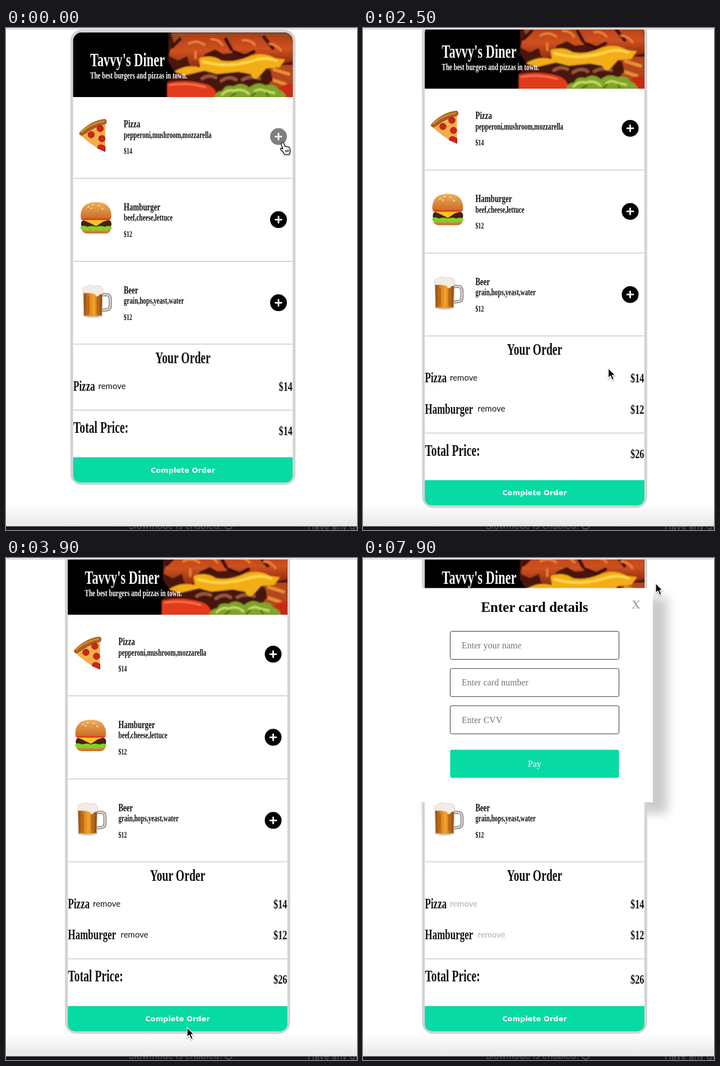
Recreate the animation shown at these times as an HTML page. Size 626 by 894 pixels, loop 8000 ms.

```html
<!DOCTYPE html>
<html lang="en">
<head>
<meta charset="utf-8">
<title>Diner order</title>
<style>
  html, body { margin: 0; height: 100%; overflow: hidden; background: #fff; }
  svg { display: block; }
  text { white-space: pre; }
  .slab { font-family: "Liberation Serif", Times, serif; font-weight: bold; }
  .serif { font-family: "Liberation Serif", Times, serif; }
  .round { font-family: Lato, sans-serif; font-size: 15px; }
  .wide { font: bold 12.9px "DejaVu Sans", Verdana, sans-serif; }
  .chrome { font: 16px Inter, sans-serif; fill: #5a5c62; }
</style>
</head>
<body>
<svg id="stage" width="626" height="894" viewBox="0 0 626 894">
  <defs>
    <linearGradient id="floor" x2="0" y2="1"><stop stop-color="#fff"/><stop offset="1" stop-color="#e6e6e6"/></linearGradient>
    <linearGradient id="bun" x2="0" y2="1"><stop stop-color="#f0ae5c"/><stop offset="1" stop-color="#c96f26"/></linearGradient>
    <linearGradient id="ale"><stop stop-color="#8f430a"/><stop offset=".3" stop-color="#d9821a"/><stop offset=".55" stop-color="#f3a52c"/><stop offset="1" stop-color="#8a3f0a"/></linearGradient>
    <linearGradient id="sauce" x2="0" y2="1"><stop stop-color="#b23c14"/><stop offset=".5" stop-color="#cf5220"/><stop offset="1" stop-color="#8e2a0e"/></linearGradient>
    <clipPath id="headClip"><path d="M119.7 123V23a15 15 0 0 1 15-15h361.6a15 15 0 0 1 15 15v100z"/></clipPath>
    <filter id="blur" x="-20%" y="-20%" width="140%" height="140%"><feGaussianBlur stdDeviation="9"/></filter>
    <filter id="soft"><feGaussianBlur stdDeviation=".9"/></filter>
    <filter id="drop" x="-50%" y="-50%" width="200%" height="200%"><feDropShadow dx="0" dy="1.5" stdDeviation="1.2" flood-opacity=".4"/></filter>
  </defs>

  <rect width="626" height="894" fill="#fff"/>
  <rect y="848" width="626" height="40" fill="url(#floor)"/>
  <rect id="shade" x="112" y="70" width="431" height="385" fill="#cbcbcb" filter="url(#blur)"/>

  <g id="page">
    <rect id="frame" x="114.7" y="3" width="401.6" rx="20" fill="#d3d3d3"/>
    <rect id="sheet" x="119.7" y="8" width="391.6" rx="15" fill="#fff"/>
    <g clip-path="url(#headClip)">
      <rect x="119" y="8" width="393" height="115"/>
      <g filter="url(#soft)">
        <path d="M290 8h222v116H287V96l16-14-14-22z" fill="#4a170b"/>
        <path d="M294 8h218v14q-40 10-90 2-60-6-122 4z" fill="#9c4a20"/>
        <path d="M291 50q2-24 22-32 24-14 46-4 24-8 44 6 14 10 8 24l-24 2-14-8-18 8-10 18q-10 14-18 0l-4-14-16 8z" fill="url(#sauce)"/>
        <path d="M404 14q24-10 48 2 36-6 60 8v36l-24 4-22-14-24 4-30-12z" fill="url(#sauce)"/>
        <path d="M296 34l14-14m96 22l20 8 16-8m18-26l16 20m-84-16l10 18" stroke="#3d1009" stroke-width="6" fill="none" stroke-linecap="round"/>
        <path d="M326 28q14-8 28 2m12-10q14 0 20 10m36-8q14-2 22 8m26-2q14 2 20 12M338 42v12" stroke="#ec7f3e" stroke-width="4" fill="none" stroke-linecap="round"/>
        <path d="M470 66h42v48h-42z" fill="#b5461b"/>
        <path d="M478 74l26 8m-30 10l24 8" stroke="#e79035" stroke-width="6" stroke-linecap="round"/>
        <path d="M318 78q60-14 154-2l4 18q-30 14-78 12-54 0-80-16z" fill="#47190f"/>
        <path d="M350 90q12-8 24-2m10 6q14-10 26-2m12 0q14-8 30-2" stroke="#95553e" stroke-width="6" fill="none" stroke-linecap="round"/>
        <path d="M300 78q20-14 46-8l-2-16q22-8 40 4 22 4 46-6 28-12 50 2l18 2-10 14-24 2-14 16q-8 6-14-6l-22-4-38 4-22-6-34 8z" fill="#f3ad17"/>
        <path d="M352 60q22 6 44 6 30-2 52-10 18-4 34 2" stroke="#ffd54a" stroke-width="5" fill="none" stroke-linecap="round"/>
        <path d="M287 124V98q34-8 70 2 18 6 20 24z" fill="#e23a1c"/>
        <path d="M291 102q34-6 66 4" stroke="#f47a4e" stroke-width="3" fill="none"/>
        <path d="M490 104q12-6 22-4v24h-22z" fill="#c92a14"/>
        <path d="M372 124q2-12 14-12 4-12 20-8 14-10 28 2 14-12 28-4 20-4 24 8 12 4 14 14z" fill="#7ea52a"/>
        <path d="M384 120q10-12 22-8 16-6 28 6m8-4q10-8 20-2l18 4" stroke="#c7dc64" stroke-width="4" fill="none"/>
        <path d="M400 122l10-6m28 6l8-8m22 8l-4-8" stroke="#47701a" stroke-width="3"/>
      </g>
    </g>
    <g id="pizza">
      <path d="M132 190Q151 186 177 168V221Q153 210 132 190z" fill="#f0ae48"/>
      <path d="M131 186Q152 164 177 162q5 4 1 9-20 6-42 21-7-1-5-6z" fill="#a95f1c"/>
      <path d="M134 186q18-17 42-20" stroke="#d08d3a" stroke-width="3" fill="none"/>
      <g fill="#cf2418" stroke="#a71a12"><circle cx="152" cy="190" r="5.7"/><circle cx="168" cy="179" r="5.7"/><circle cx="171" cy="197" r="5.7"/><path d="M163 214q0-7 8-6l6 3v9z"/></g>
    </g>
    <g id="burger">
      <path d="M135 352h52q2 14-11 14h-30q-13 0-11-14z" fill="url(#bun)"/>
      <rect x="134" y="342" width="54" height="14" rx="6" fill="#46210f"/>
      <path d="M133 354q4-4 12 0 8-3 16 0 8-3 15 0 8-3 12 0 2 5-4 4-5 5-10 1-6 5-12 0-6 4-12 0-7 4-11 0-7 1-6-5z" fill="#7ed32c"/>
      <path d="M135 341h51l-13 4-12 8-14-7z" fill="#ffc21c"/>
      <rect x="134" y="336" width="53" height="6" rx="3" fill="#e0402a"/>
      <path d="M133 336q0-26 28-26 27 0 27 26 0 3-4 3h-47q-4 0-4-3z" fill="url(#bun)"/>
      <path d="M146 319l2-1m6-3h2m9 1l2 1m4 4l2 2m-22-2h2" stroke="#fff0c5" stroke-width="1.6" stroke-linecap="round"/>
    </g>
    <g id="mug">
      <path d="M170 475h9q7 0 7 8v11q0 8-8 8l-8 1" fill="none" stroke="#7f7872" stroke-width="5.5"/>
      <path d="M170 475h9q7 0 7 8v11q0 8-8 8l-8 1" fill="none" stroke="#d8d3cd" stroke-width="3"/>
      <path d="M138 468h34l-1 45q-16 5-32 0z" fill="url(#ale)" stroke="#b9a78f" stroke-width="1.2"/>
      <path d="M147 478v30m16-30v30" stroke="#8a420c" stroke-width="1.5" opacity=".6"/>
      <path d="M140 513q15 4 30 0" stroke="#d9cfc2" stroke-width="3" fill="none"/>
      <path d="M138 472q-4-11 6-12 8-4 14 0 12-3 15 5 1 8-3 9-3-1-5 3-5 3-6-3-9-3-21-2z" fill="#f3ece4" stroke="#d6cabb" stroke-width=".8"/>
    </g>
    <g id="menu"></g>
    <g id="plusses"></g>
    <g id="orders"></g>
    <g id="total"></g>
  </g>

  <g id="modal">
    <rect x="95.5" y="53.5" width="421.5" height="381.5" fill="#fff"/>
    <text class="serif" x="306" y="96" font-size="25" font-weight="bold" text-anchor="middle">Enter card details</text>
    <text class="serif" x="487" y="90" font-size="22" font-weight="bold" text-anchor="middle" fill="#a9a9a9">X</text>
    <g id="fields"></g>
    <rect x="155.5" y="341.5" width="301" height="50" rx="3" fill="#08daa3"/>
    <text class="serif" x="306" y="372" font-size="16" text-anchor="middle" fill="#fff">Pay</text>
  </g>

  <rect width="626" height="2.5" fill="#fff"/>
  <rect y="1" width="626" height="1.5" fill="#dcc6ce"/>
  <rect y="887.5" width="626" height="7" fill="#14161d"/>
  <svg y="888" width="626" height="6">
    <text class="chrome" x="219" y="4">Slowmode is enabled.</text>
    <circle cx="397" cy="-2" r="6.5" fill="none" stroke="#5a5c62" stroke-width="1.5"/>
    <text class="chrome" x="538" y="5">Have any questions</text>
  </svg>

  <path id="arrow" d="M0 0V17.5L4 13.7 7 20.8 10.2 19.4 7.2 12.5H12.4z" stroke="#fff" stroke-width="1.3" filter="url(#drop)"/>
  <g id="hand" filter="url(#drop)" stroke="#000" stroke-width="1.2" stroke-linejoin="round">
    <path fill="#fff" d="M-1.5-.5c2-1.5 3 .5 3.5 2l1.7 5c.8-1.2 2.5-1 3 .3 1-.8 2.4-.5 2.8.6 1.5-.6 2.4.4 2.7 2l.8 5-1.5 5.6H3l-3-4.5c-1.5-2-3.5-3-4.5-5 0-2 2-2 3.5-.5l1 .6-3-8.5c-.4-1.2.3-2.2 1.5-2.6z"/>
    <path d="M4.5 12.5l1 4m1.5-4.5l1 4m1.5-4.5l.8 4"/>
  </g>
</svg>
<script>
const $ = id => document.getElementById(id);
const GREEN = '#08daa3', LOOP = 8000, ADD_AT = 1300, MODAL_AT = 5800, ROW = 55.4;

// The display face is condensed by one fixed ratio everywhere.
const slab = (x, y, size, text, anchor = 'start', color = '#111') =>
  `<text class="slab" transform="translate(${x} ${y}) scale(.68 1)" font-size="${size}" text-anchor="${anchor}" fill="${color}">${text}</text>`;
const rule = y => `<path d="M120 ${y}h391" stroke="#b4b4b4"/>`;

const menu = [
  ['Pizza', 'pepperoni,mushroom,mozzarella', 14],
  ['Hamburger', 'beef,cheese,lettuce', 12],
  ['Beer', 'grain,hops,yeast,water', 12],
];
$('menu').innerHTML =
  slab(150, 68, 33, "Tavvy's Diner", 'start', '#fbf9f2') +
  slab(150, 89.5, 16.3, 'The best burgers and pizzas in town.', 'start', '#fff') +
  menu.map(([name, parts, price], i) => {
    const y = i * 147.8;
    return slab(210, 177 + y, 19, name) + slab(210, 195.5 + y, 16.4, parts) +
      slab(210, 224 + y, 14.7, '$' + price) + rule([267.5, 415.5, 563][i]);
  }).join('') + slab(315.5, 597, 29, 'Your Order', 'middle');

$('plusses').innerHTML = menu.map((_, i) =>
  `<g transform="translate(486 ${193.3 + i * 148})"><circle r="15"/><path d="M-5.5 0h11M0-5.5v11" stroke="#fff" stroke-width="2.8" stroke-linecap="round"/></g>`).join('');
const discs = [...document.querySelectorAll('#plusses circle')];

$('orders').innerHTML = menu.slice(0, 2).map(([name, , price], i) =>
  `<g transform="translate(0 ${i * ROW})">${slab(120, 646, 25, name)}
   <text class="round" x="${[164.5, 214][i]}" y="642.5">remove</text>${slab(511, 646, 24, '$' + price, 'end')}</g>`).join('');

$('total').innerHTML = rule(680.5) + slab(120, 721, 29, 'Total Price:') +
  `<g id="one">${slab(511, 725, 24, '$14', 'end')}</g><g id="two">${slab(511, 725, 24, '$26', 'end')}</g>
   <path d="M119.7 764.5h391.6v32a13 13 0 0 1-13 13h-365.6a13 13 0 0 1-13-13z" fill="${GREEN}"/>
   <text class="wide" x="315.5" y="791.5" text-anchor="middle" fill="#fff">Complete Order</text>`;

$('fields').innerHTML = ['Enter your name', 'Enter card number', 'Enter CVV'].map((hint, i) => {
  const y = 130.5 + i * 66.3;
  return `<rect x="155.5" y="${y}" width="301" height="50" rx="3" fill="#fff" stroke="#333"/>
    <text class="serif" x="176" y="${y + 30.5}" font-size="16" fill="#757575">${hint}</text>`;
}).join('');

// Keys are [time, ...values]; values ease from key to key.
const pointerKeys = [
  [100, 494, 205], [800, 492, 349], [1800, 492, 349], [2700, 429.5, 643], [3500, 323, 843],
  [3900, 323, 836], [4300, 324, 828], [6800, 324, 828], [7600, 565, 92], [7900, 522, 45],
];
const scrollKeys = [[2000, 0], [2600, -15.8], [2800, -15.8], [3200, -22]];
function at(keys, t) {
  const n = keys.findIndex(k => k[0] > t);
  if (n === 0) return keys[0].slice(1);
  if (n < 0) return keys[keys.length - 1].slice(1);
  const a = keys[n - 1], b = keys[n], p = (t - a[0]) / (b[0] - a[0]), e = p * p * (3 - 2 * p);
  return a.slice(1).map((v, i) => v + (b[i + 1] - v) * e);
}
const show = (id, on) => $(id).style.display = on ? '' : 'none';
const move = (id, x, y) => $(id).setAttribute('transform', `translate(${x} ${y})`);

function draw(now) {
  const t = Math.floor(now % LOOP / 100) * 100;
  const added = t >= ADD_AT, paying = t >= MODAL_AT, extra = added ? ROW : 0;
  const [x, y] = at(pointerKeys, t), [scroll] = at(scrollKeys, t), shift = added ? -9.5 : 0;

  move('page', shift, scroll);
  move('total', 0, extra);
  $('frame').setAttribute('height', 811 + extra);
  $('sheet').setAttribute('height', 801.5 + extra);
  show('one', !added);
  show('two', added);
  $('orders').children[1].style.display = added ? '' : 'none';
  document.querySelectorAll('.round').forEach(r => r.setAttribute('fill', paying ? '#b0b0b0' : '#111'));
  show('modal', paying);
  show('shade', paying);
  show('plusses', !paying);

  let hover = false;
  discs.forEach((disc, i) => {
    const over = !paying && Math.hypot(x - 486 - shift, y - 193.3 - i * 148 - scroll) < 16;
    disc.setAttribute('fill', over ? '#7f7f7f' : '#000');
    hover ||= over;
  });
  show('hand', hover);
  show('arrow', !hover);
  move(hover ? 'hand' : 'arrow', x, y);
  requestAnimationFrame(draw);
}
requestAnimationFrame(draw);
</script>
</body>
</html>
```
